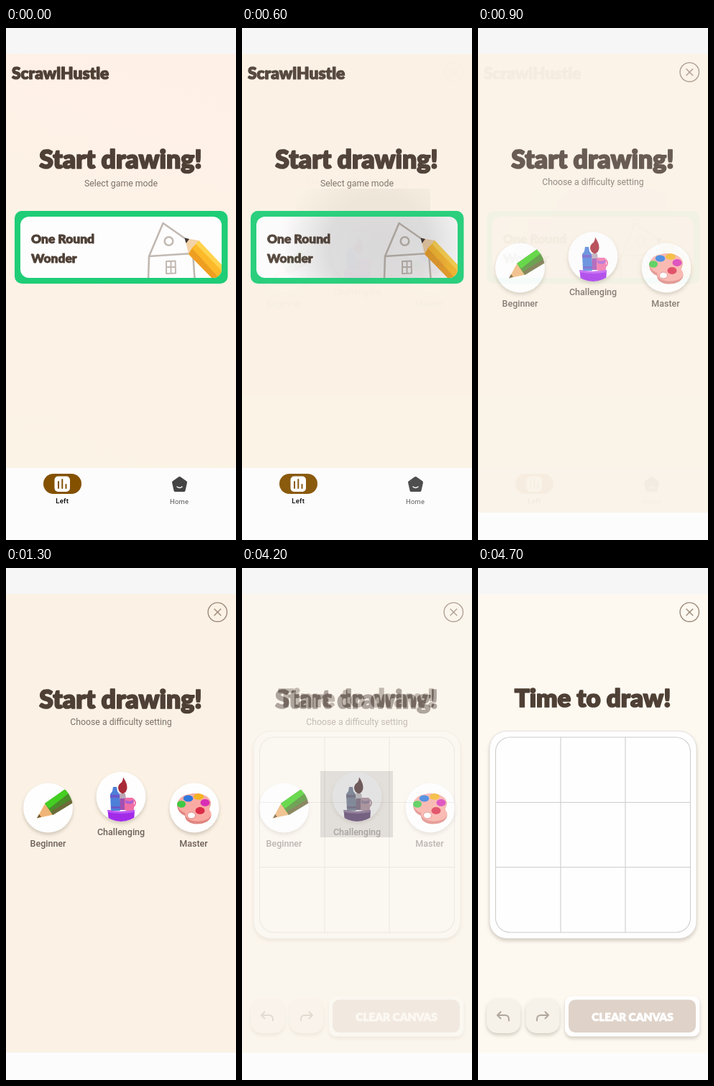
Animation of 320 by 711 pixels, one loop 8000 ms. Source, as an HTML page:

```html
<!DOCTYPE html>
<html lang="en">
<head>
<meta charset="utf-8">
<title>Drawing game</title>
<style>
  html, body { margin: 0; width: 100%; height: 100%; overflow: hidden; background: #fcfcfc; }
  svg { display: block; width: 100vw; height: 100vh; }
  text { font-family: Roboto, sans-serif; }
  .fat { font-family: Lato, sans-serif; font-weight: 900; fill: #4f4036; stroke: #4f4036; stroke-linejoin: round; }
  .mid { text-anchor: middle; }
  .head { font-size: 35.5px; stroke-width: 1.7px; }
  .sub { font-size: 12.3px; fill: #7d7067; }
  .label { font-size: 12.5px; font-weight: 500; fill: #6e6058; }
  .line { fill: none; stroke-linecap: round; stroke-linejoin: round; }
  .lift { filter: drop-shadow(0 3px 2.5px rgba(70, 50, 30, .22)); }
</style>
</head>
<body>
<svg viewBox="0 0 320 711" preserveAspectRatio="none">
  <defs>
    <linearGradient id="warm" x1=".6" y1="0" x2=".4" y2="1">
      <stop offset="0" stop-color="#fff0e7"/>
      <stop offset=".4" stop-color="#fdf2e6"/>
      <stop offset="1" stop-color="#fbf3e5"/>
    </linearGradient>
    <radialGradient id="press" gradientUnits="userSpaceOnUse" cx="190" cy="303" r="1">
      <stop offset="0" stop-color="#000" stop-opacity=".15"/>
      <stop offset=".5" stop-color="#000" stop-opacity=".13"/>
      <stop offset="1" stop-color="#000" stop-opacity="0"/>
    </radialGradient>
    <clipPath id="cardClip"><rect x="20" y="262" width="280" height="85" rx="12"/></clipPath>
    <clipPath id="discLeft"><circle cx="58.5" cy="333" r="34.5"/></clipPath>
    <clipPath id="discMid"><circle cx="160" cy="317.5" r="34.5"/></clipPath>
    <g id="close" class="line" stroke="#9c897a" stroke-width="1.4">
      <circle cx="294.3" cy="61.3" r="13.2"/>
      <path d="M290 57l8.8 8.8M298.8 57l-8.8 8.8"/>
    </g>
    <path id="undo" class="line" stroke="#b1a79d" stroke-width="2"
      d="M31.5 616.5l-4.5 4.5 4.5 4.5M27.5 621h10q5.500 0 5.500 6v1.500"/>
  </defs>

  <rect width="320" height="711" fill="#fcfcfc"/>
  <rect width="320" height="36" fill="#f6f6f6"/>

  <g id="home">
    <rect id="homeBack" y="36" width="320" height="575"/>
    <rect y="611" width="320" height="100" fill="#fdfcfd"/>
    <text class="fat" x="8" y="70.500" font-size="22.7" stroke-width="1.2">ScrawlHustle</text>
    <text class="fat head mid" x="159.500" y="195">Start drawing!</text>
    <text class="sub mid" x="160" y="220">Select game mode</text>

    <rect x="12" y="254" width="296.500" height="101" rx="10" fill="#1fcd77"/>
    <rect x="20" y="262" width="280" height="85" rx="12" fill="#fefdfe"/>
    <g clip-path="url(#cardClip)">
      <g class="line" stroke="#c1b9b1" stroke-width="2.6">
        <path d="M198 348l1-31 19.500-46 33 23M199 317l61-4 2.500 35"/>
        <circle cx="226.500" cy="296" r="5.800"/>
        <path d="M223 324l12.500-.5.5 17-13 .5zM229.500 324v16.500M223 332h12.500" stroke-width="2"/>
      </g>
      <path d="M249 292l19 3-14 19z" fill="#f3d2a8"/>
      <path d="M248.500 291.500l6.500 1.500-4.500 6z" fill="#3d3434"/>
      <path d="M254 314l5-9 5-5 4-5 34 36v17h-14z" fill="#fcb929"/>
      <path d="M264 300l4-5 34 36v8z" fill="#ffd34d"/>
      <path d="M254 314l5-8 38 42h-10z" fill="#ee9f22"/>
    </g>
    <text class="fat" x="35" y="299" font-size="17.4" stroke-width=".8">One Round</text>
    <text class="fat" x="35" y="326" font-size="17.4" stroke-width=".8">Wonder</text>
    <g id="cardPress" fill="url(#press)">
      <rect x="20" y="262" width="280" height="85" rx="12"/>
      <rect x="75" y="223" width="187" height="31" opacity=".4"/>
    </g>

    <rect x="52" y="619" width="53" height="28" rx="14" fill="#845100"/>
    <rect x="67.500" y="622.500" width="21.500" height="21.500" rx="5" fill="#fff"/>
    <path class="line" stroke="#845100" stroke-width="2" d="M73 630v9M78.300 627v12M83.500 634v5"/>
    <text class="mid" x="78.200" y="660" font-size="9.600" font-weight="500" letter-spacing=".25">Left</text>
    <path d="M241.500 625l8.500 6-2.500 11h-12l-2.500-11z" fill="#444" stroke="#444" stroke-width="4" stroke-linejoin="round"/>
    <path class="line" stroke="#fff" stroke-width="1.500" d="M238 637q3.500 2.800 7 0"/>
    <text class="mid" x="241.200" y="661" font-size="9.300" letter-spacing=".3" fill="#555">Home</text>
  </g>

  <g id="modes">
    <rect y="36" width="320" height="637" fill="#fbf2e5"/>
    <use href="#close"/>
    <text class="fat head mid" x="159.500" y="195">Start drawing!</text>
    <text class="sub mid" x="160" y="218">Choose a difficulty setting</text>
    <g class="lift" fill="#fefefe">
      <circle cx="58.500" cy="333" r="34.500"/>
      <circle cx="160" cy="317.500" r="34.500"/>
      <circle cx="262" cy="333" r="34.500"/>
    </g>
    <text class="label mid" x="58.500" y="386.500">Beginner</text>
    <text class="label mid" x="160" y="371">Challenging</text>
    <text class="label mid" x="261" y="386.500">Master</text>
  </g>

  <g id="draw">
    <rect y="36" width="320" height="637" fill="#fdf9f1"/>
    <use href="#close"/>
    <text class="fat head mid" x="159.500" y="193" style="font-size:34.8px">Time to draw!</text>
    <rect class="lift" x="16" y="226.500" width="288" height="288" rx="24" fill="#fefefe" stroke="#ddd9d4" stroke-width=".8"/>
    <g class="line" stroke="#cfcdcc" stroke-width="1.100">
      <rect x="24.500" y="235" width="271" height="271" rx="20"/>
      <path d="M115 235v271M205 235v271M24.500 325.500h271M24.500 415.500h271"/>
    </g>
    <g class="lift">
      <rect x="12" y="598" width="47" height="48" rx="15" fill="#f6f1e9"/>
      <rect x="66.500" y="598" width="47" height="48" rx="15" fill="#f6f1e9"/>
      <rect x="121" y="594.500" width="187.500" height="56" rx="10" fill="#fefefe"/>
    </g>
    <use href="#undo"/>
    <use href="#undo" transform="matrix(-1 0 0 1 125 0)"/>
    <rect x="126" y="599.500" width="177" height="45.500" rx="9" fill="#dfd2c8"/>
    <text class="fat mid" x="215" y="628.700" font-size="15.300" stroke-width=".8" style="fill:#fff;stroke:#fff">CLEAR CANVAS</text>
  </g>

  <rect id="modePress" x="109" y="282" width="101" height="92"/>
  <g id="pencil" clip-path="url(#discLeft)">
    <path d="M43 347.500l11-20 12 15z" fill="#efb577"/>
    <path d="M43 347.500l3-5.500 3 3.500z" fill="#6b5a32"/>
    <path d="M54 327l30-21 9 4v16l-28 17z" fill="#4a8c2a"/>
    <path d="M54 327l30-21 7 4-31 24z" fill="#43cf21"/>
    <path d="M65 343l-2-5 30-18v6z" fill="#6e6a3a"/>
  </g>
  <g id="cup" clip-path="url(#discMid)">
    <path d="M157 336l2-22h7l2 22z" fill="#a34fb0"/>
    <path d="M158.500 313h7l1 7h-9z" fill="#b9a7b5"/>
    <path d="M163 290.500q6 9 5.500 15-.5 6-6 8-6-2-6.500-8 0-5 5-8 2-3 2-7z" fill="#a92b38"/>
    <path d="M146 337l-1-23 3-4 1-6h5l1 6 3 4 1 23z" fill="#4c7fd8"/>
    <path d="M145 315h13v4h-13zM146 331h13v3h-13z" fill="#6a58c8"/>
    <rect x="165" y="319" width="13" height="18" rx="3" fill="#ef6fa6"/>
    <path class="line" stroke="#ef6fa6" stroke-width="2" d="M178 322q4 4 0 9"/>
    <path d="M166 322q5 4 11 0v4q-6 3-11 0z" fill="#a75fd6"/>
    <path d="M141.500 336q18 4 37.500 0l-1 17h-35z" fill="#a22be8"/>
    <path d="M141.500 336q18 4 37.500 0v3q-19 4-37.500 0z" fill="#bd55f2"/>
  </g>
  <g id="palette">
    <path d="M238 330q3-12 17-15 14-4 25 3 7 6 4 13-3 5 1 10 2 6-5 11-9 5-20 3-11-3-11-11-10-4-11-14z" fill="#df8680"/>
    <path d="M238 327q3-11 17-13 14-3 25 4 7 6 4 11-3 5 1 10 2 6-5 10-9 4-20 2-11-3-11-11-10-4-11-13z" fill="#f9aba3"/>
    <ellipse cx="258" cy="343.500" rx="5.500" ry="4.500" fill="#fff" stroke="#d98681" stroke-width="1"/>
    <ellipse cx="244" cy="328" rx="6" ry="4.800" fill="#3fc944"/>
    <ellipse cx="253.500" cy="320" rx="6.800" ry="4.500" fill="#2d79dc"/>
    <ellipse cx="268" cy="317.500" rx="7" ry="4.300" fill="#f4b321"/>
    <ellipse cx="277" cy="326" rx="6.500" ry="5" fill="#d82fb4"/>
    <ellipse cx="270" cy="337" rx="6.500" ry="5" fill="#dc2c48"/>
  </g>
</svg>
<script>
const LOOP = 8000, STEP = 100, FADE = 700;
const $ = id => document.getElementById(id);
const clamp = x => Math.min(1, Math.max(0, x));
const show = (id, opacity) => { $(id).style.opacity = opacity; };

// cubic-bezier(.4, 0, .2, 1)
function ease(x) {
  let low = 0, high = 1, s = .5;
  for (let i = 0; i < 20; i++) {
    s = (low + high) / 2;
    const at = 1.2 * s * (1 - s) ** 2 + .6 * s * s * (1 - s) + s ** 3;
    if (at < x) low = s; else high = s;
  }
  return 3 * s * s * (1 - s) + s ** 3;
}

function fade(t, start) {
  const x = clamp((t - start) / FADE);
  return x === 0 || x === 1 ? x : ease(x);
}

function render(t) {
  const toModes = fade(t, 530), toDraw = fade(t, 4000), left = 1 - toDraw;

  $('homeBack').setAttribute('fill', t < 500 ? 'url(#warm)' : '#fbf3e5');
  show('home', 1 - toModes);
  show('modes', toModes * left);
  show('draw', toDraw);

  show('cardPress', t < 500 ? 0 : clamp((t - 450) / 120));
  $('press').setAttribute('r', 45 + 95 * clamp((t - 500) / 100) + 60 * clamp((t - 600) / 400));
  show('modePress', t > 4000 ? .15 * left : 0);

  const art = toModes * left ** .6;
  show('pencil', art);
  show('palette', art);
  show('cup', toModes * left ** .4);
  $('cup').style.filter = `grayscale(${clamp((t - 4000) / 250)})`;
}

const begin = performance.now();
let last = -1;
function tick() {
  const t = Math.floor((performance.now() - begin) % LOOP / STEP) * STEP;
  if (t !== last) render(last = t);
  requestAnimationFrame(tick);
}
tick();
</script>
</body>
</html>
```
